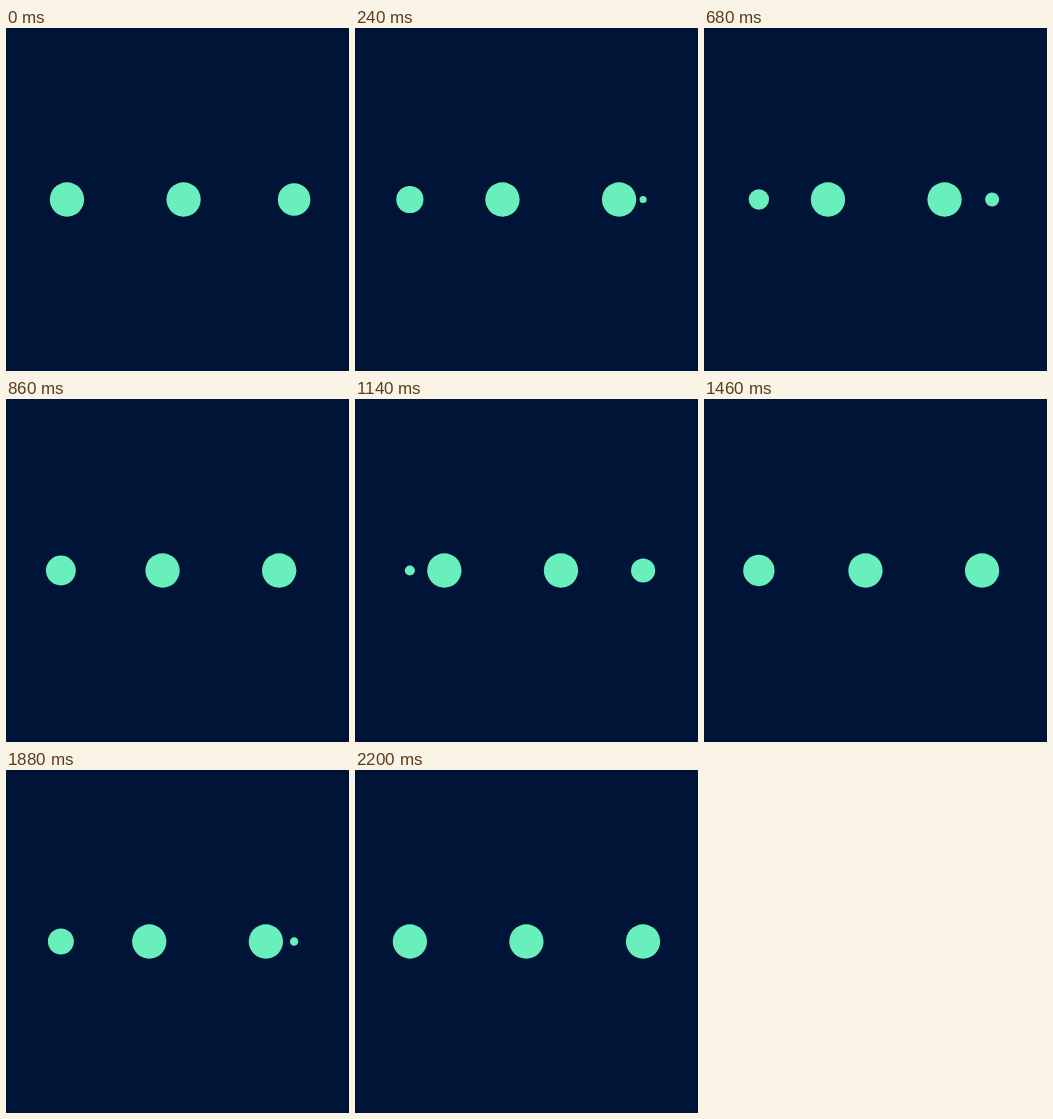
Animation of 343 by 343 pixels, one loop 2.22 s. Source, as an HTML page:

```html
<!DOCTYPE html>
<html lang="en">
<head>
<meta charset="utf-8">
<title>Loading dots</title>
<style>
  html, body {
    margin: 0;
    width: 100%;
    height: 100%;
    overflow: hidden;
    background: #001438;
  }
  svg {
    display: block;
    width: 100%;
    height: 100%;
  }
  circle {
    cy: 50px;
    r: 5px;
    fill: #69efbc;
    animation: 555ms cubic-bezier(0, .5, .5, 1) infinite;
  }
  .grow   { cx: 16px; animation-name: grow; }
  .first  { animation-name: first; }
  .second { animation-name: second; }
  .shrink { cx: 84px; animation-name: shrink; }

  @keyframes grow   { from { r: 0px; }   to { r: 5px; } }
  @keyframes first  { from { cx: 16px; } to { cx: 50px; } }
  @keyframes second { from { cx: 50px; } to { cx: 84px; } }
  @keyframes shrink { from { r: 5px; }   to { r: 0px; } }
</style>
</head>
<body>
<svg viewBox="0 0 100 100">
  <circle class="shrink"/>
  <circle class="grow"/>
  <circle class="first"/>
  <circle class="second"/>
</svg>
</body>
</html>
```
